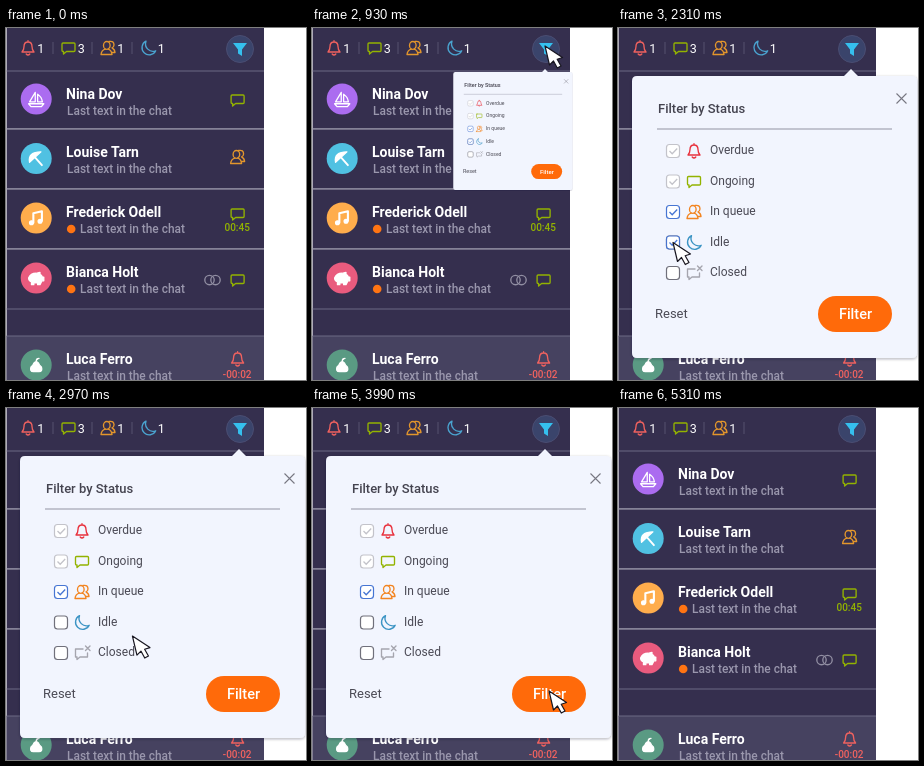
An HTML page for the animation above (5.97 s loop, 300 by 352 pixels).

```html
<!DOCTYPE html>
<html lang="en">
<head>
<meta charset="utf-8">
<title>Filter chats by status</title>
<style>
html, body { margin: 0; width: 100%; height: 100%; overflow: hidden; background: #fff; }
svg { display: block; width: 300px; height: 352px; font-family: Roboto, Arial, sans-serif; }
.icon { fill: none; stroke: currentColor; stroke-width: 1.35; stroke-linejoin: round; stroke-linecap: round; }
</style>
</head>
<body>
<svg id="stage" viewBox="0 0 300 352"></svg>
<script>
const LOOP = 5970, STEP = 30;
const RED = '#f0625f', GREEN = '#93b300', ORANGE = '#e3962c', BLUE = '#4aa3cf';

// Icons are drawn around their own centre.
const icons = {
  bell: '<path d="M-6 4Q-4 2-4-1.5Q-4-6 0-6Q4-6 4-1.5Q4 2 6 4ZM-1.8 6Q0 8 1.8 6M0-6V-7.3"/>',
  chat: '<path d="M-5.5-5H5.5Q6.5-5 6.5-4V2.5Q6.5 3.5 5.5 3.5H-2L-5 6V3.5H-5.5Q-6.5 3.5-6.5 2.5V-4Q-6.5-5-5.5-5Z"/>',
  queue: '<ellipse cx="-1.2" cy="-2.6" rx="3.3" ry="3.9"/><path d="M-7 6.5Q-6.5 2-2.5 1.2M0 1.2Q3.5 2 4 6.5H-7M1-6.5Q6-7.5 6-3Q5.8-.6 4-.2Q6.8 1.2 7 4.5H4"/>',
  moon: '<path d="M-2.5-6.8A7.2 7.2 0 1 0 7.2 2.8A7.5 7.5 0 0 1-2.5-6.8Z"/>',
  rings: '<circle cx="-3" r="4.7"/><circle cx="3" r="4.7"/>',
  closed: '<path d="M1-4H-6.5V4H-5V6.5L-2 4H5.5V0M3.5-7L8-2.5M8-7L3.5-2.5"/>',
  boat: '<path d="M-1-7V3H-7ZM1.5-5Q6-2 6.5 3H1.5ZM-8 5H8L5.5 8H-5.5Z"/>',
  parasol: '<path d="M-7 4Q-9-7 5-7Z" fill="#fff"/><path d="M-1-1L6 7" stroke-width="2"/>',
  note: '<path d="M-3 5V-5L6-7V3" stroke-width="2.2"/><circle cx="-5" cy="5" r="2" fill="#fff"/><circle cx="4" cy="3.5" r="2" fill="#fff"/>',
  pig: '<path d="M-8 0Q-6-5 0-5L4-6V-4Q6-3 6.5-1H8V3H6L4 7H1.5V5H-2.5V7H-5V4Q-8 3-8 0Z" fill="#fff"/>',
  pear: '<path d="M-2.5-2Q0-5 2.5-2Q3 0 5.5 2Q7 7 3 7H-3Q-7 7-5.5 2Q-3 0-2.5-2ZM0-4Q0-7 3-7" fill="#fff"/>'
};

const icon = (name, x, y, color, scale = 1) =>
  `<g class="icon" color="${color}" transform="translate(${x} ${y}) scale(${scale})">${icons[name]}</g>`;
const text = (x, y, str, size, fill, weight = 400, anchor = 'start') =>
  `<text x="${x}" y="${y}" font-size="${size}" fill="${fill}" font-weight="${weight}" text-anchor="${anchor}">${str}</text>`;
const rect = (x, y, w, h, fill, extra = '') =>
  `<rect x="${x}" y="${y}" width="${w}" height="${h}" fill="${fill}" ${extra}/>`;

function contact(y, name, color, avatar, cy, dot) {
  return `<circle cx="30.2" cy="${cy}" r="15.5" fill="${color}"/>` + icon(avatar, 30.2, cy, '#fff', .95) +
    text(60, y, name, 14, '#fff', 700) +
    (dot ? `<circle cx="65.2" cy="${y + 12}" r="4.3" fill="#ff7413"/>` : '') +
    text(dot ? 74 : 61, y + 16, 'Last text in the chat', 11.9, '#9a97ad', 500);
}

function counter(x, name, color, count, id = name) {
  return `<g id="${id}">` + icon(name, x, 20, color) + text(x + 9.2, 24.5, count, 12.5, '#fff') + '</g>';
}

const status = (name, y, color) => icon(name, 231.6, y, color);
const timer = (y, str, color) => text(231.2, y, str, 10, color, 500, 'middle');

const box = (y, color) => rect(48.5, y - 6.5, 13, 13, '#fff', `rx="3" stroke="${color}" stroke-width="1.2"`);
const checked = (y, color) => box(y, color) +
  `<path d="M51.5 ${y}l2.7 2.8 5-5.3" fill="none" stroke="${color}" stroke-width="1.3"/>`;

function option(y, label, name, color, check) {
  return check + icon(name, 76, y, color) + text(92, y + 3, label, 12, '#4b4a55');
}

const list =
  rect(.6, 0, 257.4, 352, '#352f4e') + rect(.6, 308, 257.4, 44, '#464260') +
  [43, 281, 308].map(y => rect(.6, y - .5, 257.4, 1, '#6d6a83')).join('') +
  [100, 160, 220].map(y => rect(.6, y + .2, 257.4, 1.4, '#9a97aa')).join('') +
  [47, 86, 126].map(x => rect(x - .5, 14, 1, 12, '#57536e')).join('') +
  counter(22, 'bell', RED, 1) + counter(62.5, 'chat', GREEN, 3) +
  counter(102, 'queue', ORANGE, 1) + counter(142.5, 'moon', BLUE, 1, 'idle') +
  '<circle cx="234" cy="21" r="13.5" fill="#3a446b" stroke="#4a4d72"/>' +
  '<path d="M227 15H241L236 21.5V28L232 25.5V21.5Z" fill="#35c0ee"/>' +
  contact(71, 'Nina Dov', '#ab6cf0', 'boat', 71) + status('chat', 72, GREEN) +
  contact(128.5, 'Louise Tarn', '#50c1e2', 'parasol', 130.5) + status('queue', 129, ORANGE) +
  contact(189, 'Frederick Odell', '#ffad4c', 'note', 190, true) + status('chat', 186, GREEN) +
  timer(203, '00:45', GREEN) +
  contact(249, 'Bianca Holt', '#e95b7e', 'pig', 250, true) + icon('rings', 206.5, 252, '#918ea2') +
  status('chat', 252, GREEN) +
  contact(336, 'Luca Ferro', '#5a9a83', 'pear', 337) + status('bell', 331, RED) +
  timer(349.5, '-00:02', RED);

const popup =
  `<path d="M19 48H226L233 41L240 48H294Q299 48 299 53V325Q299 330 294 330H19Q14 330 14 325V53Q14 48 19 48Z"
    fill="#f2f5fe" filter="url(#shadow)"/>` +
  text(40, 85, 'Filter by Status', 13, '#44434f', 500) + rect(39, 100.5, 235, 1, '#9494a4') +
  '<path d="M278.5 65.5l10 10m0-10l-10 10" stroke="#777782" stroke-width="1.1"/>' +
  option(123, 'Overdue', 'bell', '#e8303c', checked(123, '#c3c3ca')) +
  option(153.5, 'Ongoing', 'chat', GREEN, checked(153.5, '#c3c3ca')) +
  option(184, 'In queue', 'queue', '#f28420', checked(184, '#4675d3')) +
  option(214.5, 'Idle', 'moon', '#3c94c4', box(214.5, '#70707b') + `<g id="tick">${checked(214.5, '#4675d3')}</g>`) +
  option(245, 'Closed', 'closed', '#a5a5ae', box(245, '#70707b')) +
  text(37, 289.5, 'Reset', 13, '#4b4a55') +
  rect(200, 268, 74, 36, '#ff6a0a', 'rx="18"') + text(237.5, 291, 'Filter', 14.5, '#fff', 500, 'middle');

const $ = id => document.getElementById(id);
$('stage').innerHTML =
  `<defs><filter id="shadow" x="-5%" y="-5%" width="110%" height="110%">
    <feDropShadow dx="0" dy="1" stdDeviation="1.5" flood-color="#1c1838" flood-opacity=".35"/></filter></defs>` +
  list + `<g id="popup">${popup}</g>` +
  `<path id="cursor" d="M0 0L4.5 19L8.5 15L12.3 22L16 20L12.2 13.2L17.5 11.5Z"
    fill="#fff" stroke="#17151f" stroke-width="1.2" stroke-linejoin="round"/>`;

const part = (t, a, b) => Math.min(1, Math.max(0, (t - a) / (b - a)));
const ease = (t, a, b) => (1 - Math.cos(Math.PI * part(t, a, b))) / 2;
const mix = (a, b, k) => a + (b - a) * k;
const bezier = (a, b, c, k) => mix(mix(a, b, k), mix(b, c, k), k);
const click = (t, a, b) => Math.sin(Math.PI * part(t, a, b));

function cursorAt(t) {
  if (t < 1395) {
    const k = ease(t, 195, 510);
    return [bezier(-20, 115, 233, k), bezier(205, -26, 18, k)];
  }
  if (t < 2595) {
    const k = ease(t, 1395, 1995);
    return [mix(233, 55, k), mix(18, 214.5, k)];
  }
  const k = ease(t, 2595, 3465);
  return [mix(55, 237, k), mix(214.5, 283, (k + k ** 6) / 2)];
}

function draw(now) {
  const t = Math.floor(now % LOOP / STEP) * STEP;
  const closing = ease(t, 4030, 4260);
  const size = ease(t, 805, 1084) * (1 - closing);
  const press = click(t, 510, 795) + click(t, 1995, 2295) + click(t, 3705, 3990);
  $('popup').setAttribute('transform', `translate(233 41) scale(${size}) translate(-233 -41)`);
  $('popup').setAttribute('visibility', size > .001 ? 'visible' : 'hidden');
  $('idle').setAttribute('opacity', 1 - closing);
  $('tick').setAttribute('opacity', 1 - part(t, 2295, 2595));
  $('cursor').setAttribute('transform', `translate(${cursorAt(t)}) scale(${1 - .2 * press})`);
  $('cursor').setAttribute('opacity', 1 - part(t, 4990, 5310));
}

const start = performance.now();
function tick() {
  draw(performance.now() - start);
  requestAnimationFrame(tick);
}
tick();
</script>
</body>
</html>
```
